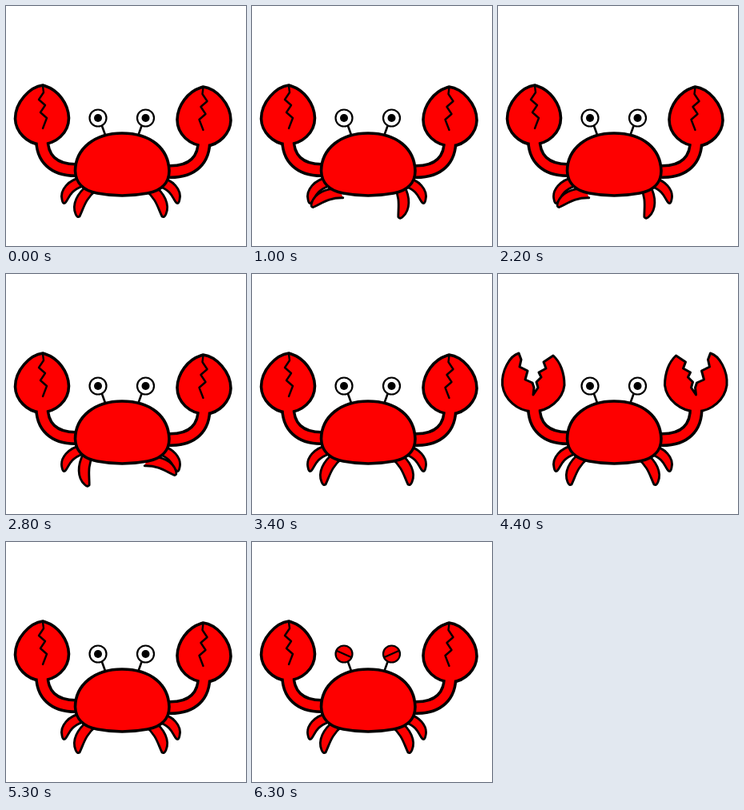
Recreate the animation shown at these times as an HTML page. Size 300 by 300 pixels, loop 6.6 s.

```html
<!DOCTYPE html>
<html lang="en">
<head>
<meta charset="utf-8">
<title>Crab</title>
<style>
  html, body { margin: 0; height: 100%; overflow: hidden; background: #fff; }
  svg { display: block; width: 100vw; height: 100vh; }
  .right { transform: translate(292.5px, 2px) scale(-1, 1); }
</style>
</head>
<body>
<svg viewBox="0 0 300 300" fill="#fe0000" stroke="#000" stroke-width="3.6" stroke-linejoin="round" stroke-linecap="round">
  <defs>
    <path id="outer" d="M95 214C78 217 67 230 70 242Q71 248 74 246C79 241 78 232 96 225"/>
    <path id="inner" d="M102 224C89 234 82 248 87 260Q89 265 92 263C97 253 99 241 113 230"/>
    <path id="arm" d="M45 164C44 190 59 206 90 205" fill="none"/>
    <g id="shut">
      <path d="M46 99C30 101 11.500 120 11.500 141C12 157 26 172 43 173C63 173 78.500 158 78.500 140C78 122 65 105 49 100Z"/>
      <path d="M46 100L47 108L41 117L49 124L43 133L51 140L46 153" fill="none" stroke-width="2.4"/>
    </g>
    <path id="open" d="M26 99C15 102 4 121 5.500 139C8 157 24 171 43 172C63 172 81 157 83 139C83 124 78 110 69 102L57 110L60 118L51 123L54 129L48 135L50 142L44 151L45 142L43 136L34 132L37 121L27 116L29 107Z" stroke-width="3"/>
    <g id="eye">
      <path d="M5 10L9 21" stroke-width="2.6"/>
      <circle class="awake" r="10.5" fill="#fff" stroke-width="2.2"/>
      <circle class="awake" r="5" fill="#000" stroke="none"/>
      <g class="blink" stroke-width="2.2"><circle r="10.5"/><path d="M-9 -4L9 4"/></g>
    </g>
  </defs>
  <g stroke-width="2.8">
    <use class="leg" href="#outer"/>
    <use class="leg" href="#inner"/>
    <g transform="translate(287) scale(-1 1)">
      <use class="leg" href="#outer"/>
      <use class="leg" href="#inner"/>
    </g>
  </g>
  <g stroke-width="18">
    <use href="#arm"/>
    <use href="#arm" class="right"/>
  </g>
  <g class="shut">
    <use href="#shut"/>
    <use href="#shut" class="right"/>
  </g>
  <g class="open">
    <use href="#open"/>
    <use href="#open" transform="translate(291.5) scale(-1 1)"/>
  </g>
  <g stroke="#fe0000" stroke-width="11">
    <use href="#arm"/>
    <use href="#arm" class="right"/>
  </g>
  <use href="#eye" x="115" y="140"/>
  <use href="#eye" transform="translate(174.500 140) scale(-1 1)"/>
  <path d="M86.500 206C87 178 111 159 145 159C181 159 203 178 204 206C204 222 193 231 177 234Q145 240 114 234C98 231 87 222 86.500 206Z"/>
</svg>
<script>
const LOOP = 6600, STEP = 300, OUT = 40, IN = -25;
const all = s => [...document.querySelectorAll(s)];
const show = (s, on) => all(s).forEach(e => e.style.display = on ? "" : "none");
const legs = all(".leg");
const pivots = ["90 222", "100 236"];

// Angles of left outer, left inner, right outer, right inner
const still = [0, 0, 0, 0];
const gait = [
  [0, OUT, 0, IN],
  [OUT, 0, IN, 0],
  [0, IN, 0, OUT],
  [IN, 0, OUT, 0]
];

function draw(now) {
  const t = now % LOOP;
  const walking = t >= 1000 && t < 3400;
  const pose = walking ? gait[Math.floor((t - 1000) / STEP) % 4] : still;
  legs.forEach((leg, i) => leg.setAttribute("transform", `rotate(${pose[i]} ${pivots[i % 2]})`));

  const snap = t >= 4400 && t < 5300 && Math.floor((t - 4400) / STEP) % 2 === 0;
  show(".open", snap);
  show(".shut", !snap);

  const blink = t >= 6300;
  show(".blink", blink);
  show(".awake", !blink);
}

const start = performance.now();
function tick() {
  draw(performance.now() - start);
  requestAnimationFrame(tick);
}
tick();
</script>
</body>
</html>
```
